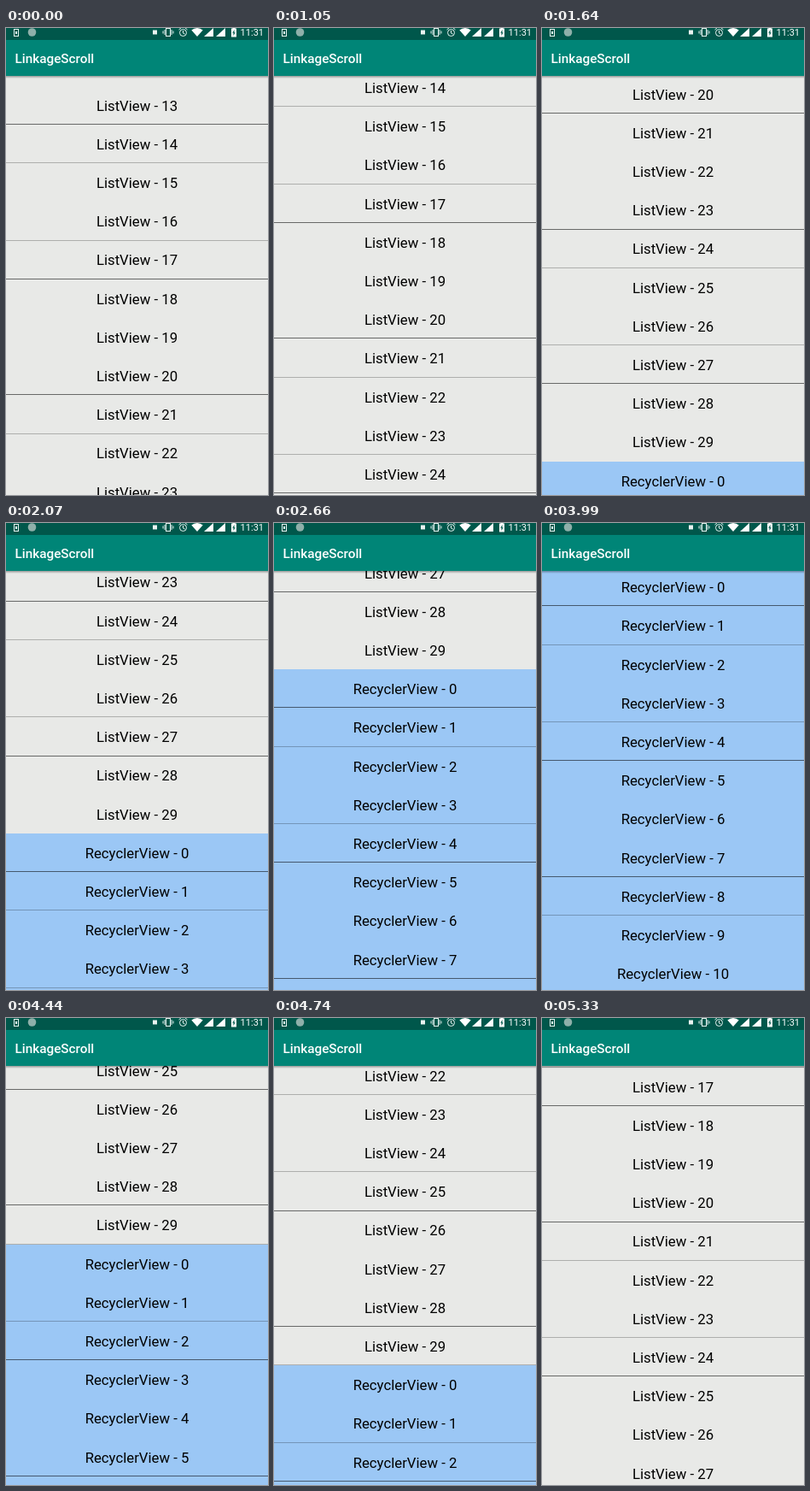
An HTML page with a canvas that plays this animation: 307 by 546 pixels, repeating every 6.22 s.

```html
<!DOCTYPE html>
<html lang="en">
<head>
<meta charset="utf-8">
<title>Linked scrolling lists</title>
<style>
  html, body { margin: 0; width: 100%; height: 100%; overflow: hidden; }
  canvas { display: block; width: 307px; height: 546px; }
</style>
</head>
<body>
<canvas id="stage" width="307" height="546"></canvas>
<script>
const W = 307, H = 546, LOOP = 6220;
const PITCH = 45.2, LIST_ROWS = 30, BAR_BOTTOM = 56, STATUS_BOTTOM = 14;
const STEPS = 30, FIRST_STEP = 1050;
const INK = '#e8f2f0';
const ctx = document.getElementById('stage').getContext('2d');

// Turning points of the drag: step, centre of row 0, row where the divider rhythm begins
const KEYS = [
  [0, -496.6, 6], [5, -826, 2], [12, -1161.5, 2], [17, -1514, 6],
  [21, -1280.5, 2], [26, -926.4, 0], [STEPS, -687.4, 6]
];

function rect(x, y, w, h, color) {
  ctx.fillStyle = color;
  ctx.fillRect(x, y, w, h);
}

function shape(points, color) {
  ctx.fillStyle = color;
  ctx.beginPath();
  points.forEach(([x, y]) => ctx.lineTo(x, y));
  ctx.fill();
}

function text(str, x, y, font, color, align = 'left') {
  ctx.font = `${font} Roboto, sans-serif`;
  ctx.textAlign = align;
  ctx.fillStyle = color;
  ctx.fillText(str, x, y);
}

// The picture advances in slightly lengthening steps on a 10 ms clock
function stepTime(k) {
  return FIRST_STEP + 10 * Math.round(14.59 * k + 0.0055 * k * k);
}

function stepAt(t) {
  let step = 0;
  while (step < STEPS && stepTime(step) <= t) step++;
  return step;
}

function scrollAt(step) {
  const i = Math.max(1, KEYS.findIndex(key => key[0] >= step));
  const [s0, y0, p0] = KEYS[i - 1], [s1, y1, p1] = KEYS[i];
  const f = (step - s0) / (s1 - s0);
  return { top: y0 + (y1 - y0) * f, phase: f < 0.5 ? p0 : p1 };
}

// Hairlines come and go with a seven-row rhythm
function dividerAlpha(row, phase) {
  const u = (2 * (row - phase + 7) + 6.5) % 7;
  return Math.max(0, 0.7 - 0.3 * Math.min(u, 7 - u));
}

function drawRows({ top, phase }) {
  const first = Math.floor((BAR_BOTTOM - top) / PITCH - 0.5);
  const last = Math.ceil((H - top) / PITCH + 0.5);
  for (let n = first; n <= last; n++) {
    const y = top + n * PITCH;
    const line = Math.floor(y + 21.4);
    const inList = n < LIST_ROWS;
    const label = inList ? `ListView - ${n}` : `RecyclerView - ${n - LIST_ROWS}`;
    rect(0, Math.floor(y - PITCH + 21.4) + 1, W, 48, inList ? '#e8e9e7' : '#9bc7f5');
    rect(0, line, W, 1, `rgba(0,0,0,${dividerAlpha(n, phase)})`);
    text(label, W / 2, y + 5.6, '16.75px', '#000', 'center');
  }
}

function drawClock(x, y) {
  ctx.beginPath();
  ctx.arc(x, y, 4, 0, 7);
  ctx.moveTo(x, y - 2.5);
  ctx.lineTo(x, y + 0.5);
  ctx.lineTo(x + 2, y + 1.5);
  for (const side of [-1, 1]) {
    ctx.moveTo(x + side * 5, y - 3.5);
    ctx.lineTo(x + side * 2.5, y - 5.5);
  }
  ctx.stroke();
}

function drawVibrate(x, y) {
  ctx.strokeRect(x - 2.5, y - 4.5, 5, 9);
  for (const side of [-1, 1]) {
    rect(x + side * 4 - 0.5, y - 3, 1, 6, INK);
    rect(x + side * 6 - 0.5, y - 1.5, 1, 3, INK);
  }
}

function drawWifi(x, y) {
  ctx.fillStyle = '#fff';
  ctx.beginPath();
  ctx.moveTo(x, y);
  ctx.arc(x, y, 10, -2.3, -0.84);
  ctx.fill();
}

function drawBattery(x, y) {
  rect(x - 3, y + 0.5, 6, 10, '#fff');
  rect(x - 1.5, y, 3, 1, '#fff');
  shape([[x + 0.5, y + 2], [x - 1.7, y + 6], [x + 0.5, y + 5.5]], '#00574b');
  shape([[x - 0.5, y + 9], [x + 1.7, y + 5], [x - 0.5, y + 5.5]], '#00574b');
}

function drawStatus() {
  ctx.strokeStyle = INK;
  ctx.lineWidth = 1;
  ctx.strokeRect(9.5, 1.5, 5, 8);
  rect(11, 4, 2, 3, INK);
  ctx.fillStyle = '#8fb0aa';
  ctx.beginPath();
  ctx.arc(30.5, 5, 4.8, 0, 7);
  ctx.fill();
  rect(172, 2.5, 5, 5, INK);
  drawVibrate(190, 5);
  drawClock(207.5, 5.5);
  drawWifi(224, 10);
  for (const x of [232, 246]) shape([[x, 10], [x + 11, 10], [x + 11, 0]], '#fff');
  drawBattery(267, 0);
  text('11:31', 302, 9, '11px', '#fff', 'right');
}

function drawHeader() {
  const shadow = ctx.createLinearGradient(0, BAR_BOTTOM, 0, BAR_BOTTOM + 3);
  shadow.addColorStop(0, 'rgba(0,0,0,.35)');
  shadow.addColorStop(1, 'rgba(0,0,0,0)');
  rect(0, BAR_BOTTOM, W, 3, shadow);
  rect(0, 0, W, BAR_BOTTOM, '#008577');
  rect(0, 0, W, STATUS_BOTTOM, '#00574b');
  text('LinkageScroll', 10.5, 41, '500 15.3px', '#fff');
  drawStatus();
}

const start = performance.now();
function tick() {
  const t = (performance.now() - start) % LOOP;
  drawRows(scrollAt(stepAt(t)));
  drawHeader();
  requestAnimationFrame(tick);
}
tick();
</script>
</body>
</html>
```
